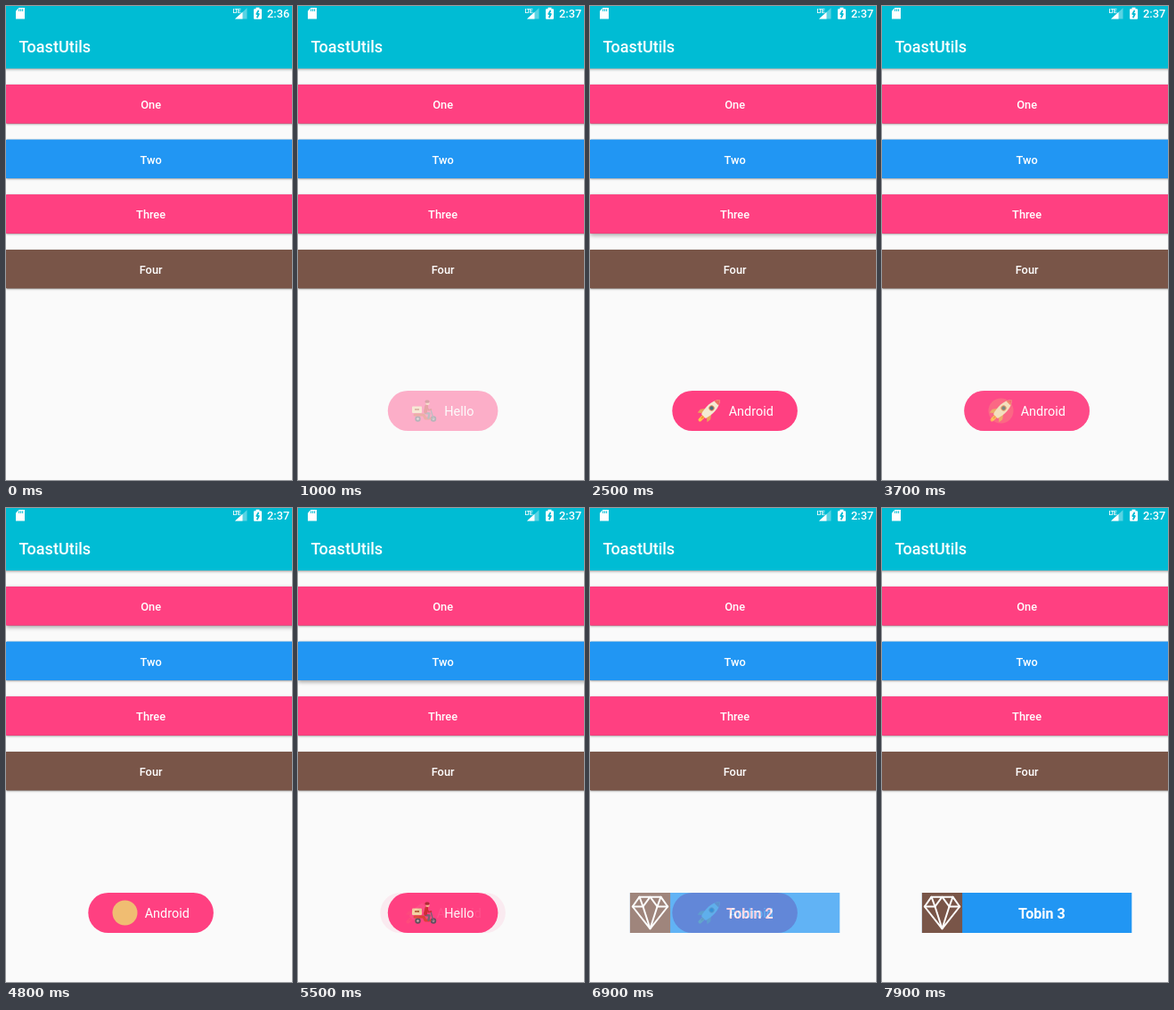
An HTML page with a canvas for the animation above (8 s loop, 321 px wide and 531 px high).

```html
<!DOCTYPE html>
<html lang="en">
<head>
<meta charset="utf-8">
<title>ToastUtils</title>
<style>
  html, body { margin: 0; width: 100%; height: 100%; overflow: hidden; background: #fafafa; }
  canvas { display: block; width: 321px; height: 531px; }
</style>
</head>
<body>
<canvas id="stage" width="321" height="531"></canvas>
<script>
const W = 321, H = 531, LOOP = 8000;
const FADE = 400, HOLD = 220, RAMP = 30, SETTLE = 100;
const PINK = '#ff4081', BLUE = '#2196f3', BROWN = '#795548', CYAN = '#00bcd4';
const CENTER = 162.6, TOAST_Y = 430.9, TOAST_H = 45.2, TOAST_MID = TOAST_Y + TOAST_H / 2;
const FIRST_Y = 88, PITCH = 61.65, BUTTON_H = 43.4;

const screen = document.getElementById('stage').getContext('2d');
const layer = Object.assign(document.createElement('canvas'), { width: W, height: H });
const layerCtx = layer.getContext('2d');

const buttons = [
  { label: 'One', color: PINK, toast: c => pill(c, 123.6, 'Hello', scooter) },
  { label: 'Two', color: BLUE, toast: c => pill(c, 140.6, 'Android', rocket) },
  { label: 'Three', color: PINK, toast: c => pill(c, 140.6, 'Android', badge) },
  { label: 'Four', color: BROWN, toast: banner }
];

// Which button is tapped, and when the finger lifts.
const order = [0, 1, 2, 1, 2, 0, 1, 3, 3];
const lifts = [910, 1690, 2690, 3520, 4090, 4990, 5485, 6720, 7520];
const taps = order.map((button, i) => ({
  button,
  up: lifts[i],
  repeat: order.slice(0, i).filter(b => b === button).length
}));

const clamp = v => Math.max(0, Math.min(1, v));

function text(c, str, x, y, size, weight = 400, align = 'left') {
  c.font = `${weight} ${size}px Roboto, sans-serif`;
  c.textAlign = align;
  c.fillStyle = '#fff';
  c.fillText(str, x, y);
}

function path(c, pts) {
  c.beginPath();
  pts.forEach(p => c.lineTo(...p));
}

function poly(c, color, ...pts) {
  path(c, pts);
  c.fillStyle = color;
  c.fill();
}

function line(c, color, width, ...pts) {
  path(c, pts);
  c.strokeStyle = color;
  c.lineWidth = width;
  c.lineJoin = c.lineCap = 'round';
  c.stroke();
}

function disc(c, color, x, y, r) {
  c.beginPath();
  c.arc(x, y, r, 0, Math.PI * 2);
  c.fillStyle = color;
  c.fill();
}

function box(c, color, x, y, w, h, r = 0) {
  c.beginPath();
  c.roundRect(x, y, w, h, r);
  c.fillStyle = color;
  c.fill();
}

// A surface with an all-round shadow and one cast downwards.
function raised(c, color, x, y, w, h, lift) {
  c.save();
  for (const [alpha, drop, blur] of [[0.15, 0, 2], [0.32, 1 + 1.3 * lift, 2.2 + 3 * lift]]) {
    c.shadowColor = `rgba(0,0,0,${alpha})`;
    c.shadowOffsetY = drop;
    c.shadowBlur = blur;
    box(c, color, x, y, w, h, 1);
  }
  c.restore();
}

function statusBar(c, clock) {
  const top = 2, bottom = 14.6;
  poly(c, '#fff', [14.5, top], [21, top], [21, bottom], [11, bottom], [11, 5.5]);
  for (let x = 14.2; x < 19; x += 2) box(c, CYAN, x, 3.3, 1, 2.6);

  const signal = (color, x) =>
    poly(c, color, [x, bottom], [257, bottom], [x, bottom - (x - 257) * 0.92]);
  signal('rgba(255,255,255,.35)', 270.5);
  signal('#fff', 265.5);
  c.letterSpacing = '-1px';
  text(c, 'LTE', 254.5, 8, 7, 500);
  c.letterSpacing = '0px';

  box(c, '#fff', 278, 3.2, 9, 11.6, 1);
  box(c, '#fff', 280.5, 1.7, 4, 2);
  line(c, CYAN, 1.8, [283.2, 5.5], [281.3, 9], [283.8, 9], [282, 12.5]);
  text(c, clock, 293, 13, 12.8, 500);
}

// The icons are drawn around their own middle.
function scooter(c) {
  for (const x of [-7.5, 10]) {
    disc(c, '#56505c', x, 9, 3.2);
    disc(c, '#c9b0b5', x, 9, 1.3);
  }
  line(c, '#d8432f', 3, [-11, 4.5], [-1, 4.5], [1, 8.5], [6, 8.5]);
  box(c, '#f3d0a0', -14, -5, 11, 7.5, 1);
  box(c, '#b5653c', -11, -2.5, 5, 2);
  line(c, '#6a6672', 2.4, [1, 2.5], [5.5, 3], [4.5, 8]);
  line(c, '#c92a30', 4, [2.2, -5], [1, 1]);
  line(c, '#6a6672', 1.3, [7, -1.5], [10, 9]);
  line(c, '#c92a30', 1.6, [3, -4], [4.5, -0.8], [7.5, -1.5]);
  disc(c, '#f2b78c', 3.5, -8.6, 2.2);
  box(c, '#a82532', 0.5, -12, 5, 3.2, 1.5);
}

function rocket(c) {
  c.rotate(Math.PI / 4);
  c.scale(0.95, 0.95);
  line(c, '#ffc54a', 4, [0, 9], [0, 15]);
  line(c, '#f58a3c', 2, [0, 9], [0, 12]);
  for (const side of [-1, 1]) {
    poly(c, '#e9a25b', [side * 4, 0], [side * 8.5, 6], [side * 8, 11], [side * 3, 7]);
  }
  c.beginPath();
  c.moveTo(0, -18.5);
  c.bezierCurveTo(7, -11, 6, 1, 3.6, 9);
  c.lineTo(-3.6, 9);
  c.bezierCurveTo(-6, 1, -7, -11, 0, -18.5);
  c.fillStyle = '#f4ead2';
  c.fill();
  c.clip();
  box(c, '#ed7161', -8, -20, 16, 7.5);
  disc(c, '#e08a5c', 0, -4.5, 3.3);
  disc(c, '#4c6f7d', 0, -4.5, 2.3);
}

function badge(c) {
  disc(c, '#f0bd72', 0, 0, 14);
}

function pill(c, width, label, icon) {
  const left = CENTER - width / 2;
  box(c, PINK, left, TOAST_Y, width, TOAST_H, TOAST_H / 2);
  text(c, label, left + 63.4, 459, 14.45);
  c.save();
  c.translate(left + 41.2, TOAST_MID);
  icon(c);
  c.restore();
}

function diamond(c, x, y) {
  c.save();
  c.translate(x, y);
  for (const side of [-1, 1]) {
    const tip = [0, 17.8], rim = [side * 19.7, -7], corner = [side * 12, -17.8];
    const facet = [side * 8, -7], crown = [0, -17.8];
    line(c, '#fff', 2, crown, corner, rim, tip, facet, crown);
    line(c, '#fff', 2, rim, facet, corner);
  }
  c.restore();
}

function banner(c, repeat) {
  const width = 235.4, left = CENTER - width / 2;
  box(c, BLUE, left, TOAST_Y, width, TOAST_H);
  box(c, BROWN, left, TOAST_Y, TOAST_H, TOAST_H);
  diamond(c, left + TOAST_H / 2, TOAST_MID);
  text(c, `Tobin ${2 + repeat}`, 179.3, 459.5, 16, 700, 'center');
}

function pressed(index, t) {
  return Math.max(...taps.filter(p => p.button === index).map(({ up }) =>
    Math.min(clamp((t - up + HOLD) / RAMP), 1 - clamp((t - up) / SETTLE))));
}

// Fade in decelerates, fade out accelerates.
function toastAlpha(i, t) {
  const enter = clamp((t - taps[i].up) / FADE);
  const leave = i + 1 < taps.length ? clamp((t - taps[i + 1].up) / FADE) : 0;
  return (1 - (1 - enter) ** 2) * (1 - leave ** 2);
}

function draw(t) {
  const c = screen;
  c.fillStyle = '#fafafa';
  c.fillRect(0, 0, W, H);
  raised(c, CYAN, -10, -10, W + 20, 80, 0.2);
  statusBar(c, t < 700 ? '2:36' : '2:37');
  text(c, 'ToastUtils', 14.5, 52, 18, 500);

  buttons.forEach(({ label, color }, i) => {
    const y = FIRST_Y + i * PITCH;
    raised(c, color, 0, y, 325, BUTTON_H, pressed(i, t));
    text(c, label, CENTER, Math.round(y + 26.9), 12.8, 500, 'center');
  });

  taps.forEach(({ button, repeat }, i) => {
    const alpha = toastAlpha(i, t);
    if (!alpha) return;
    layerCtx.clearRect(0, 0, W, H);
    buttons[button].toast(layerCtx, repeat);
    c.globalAlpha = alpha;
    c.drawImage(layer, 0, 0);
    c.globalAlpha = 1;
  });
}

const start = performance.now();
function tick() {
  draw((performance.now() - start) % LOOP);
  requestAnimationFrame(tick);
}
tick();
</script>
</body>
</html>
```
